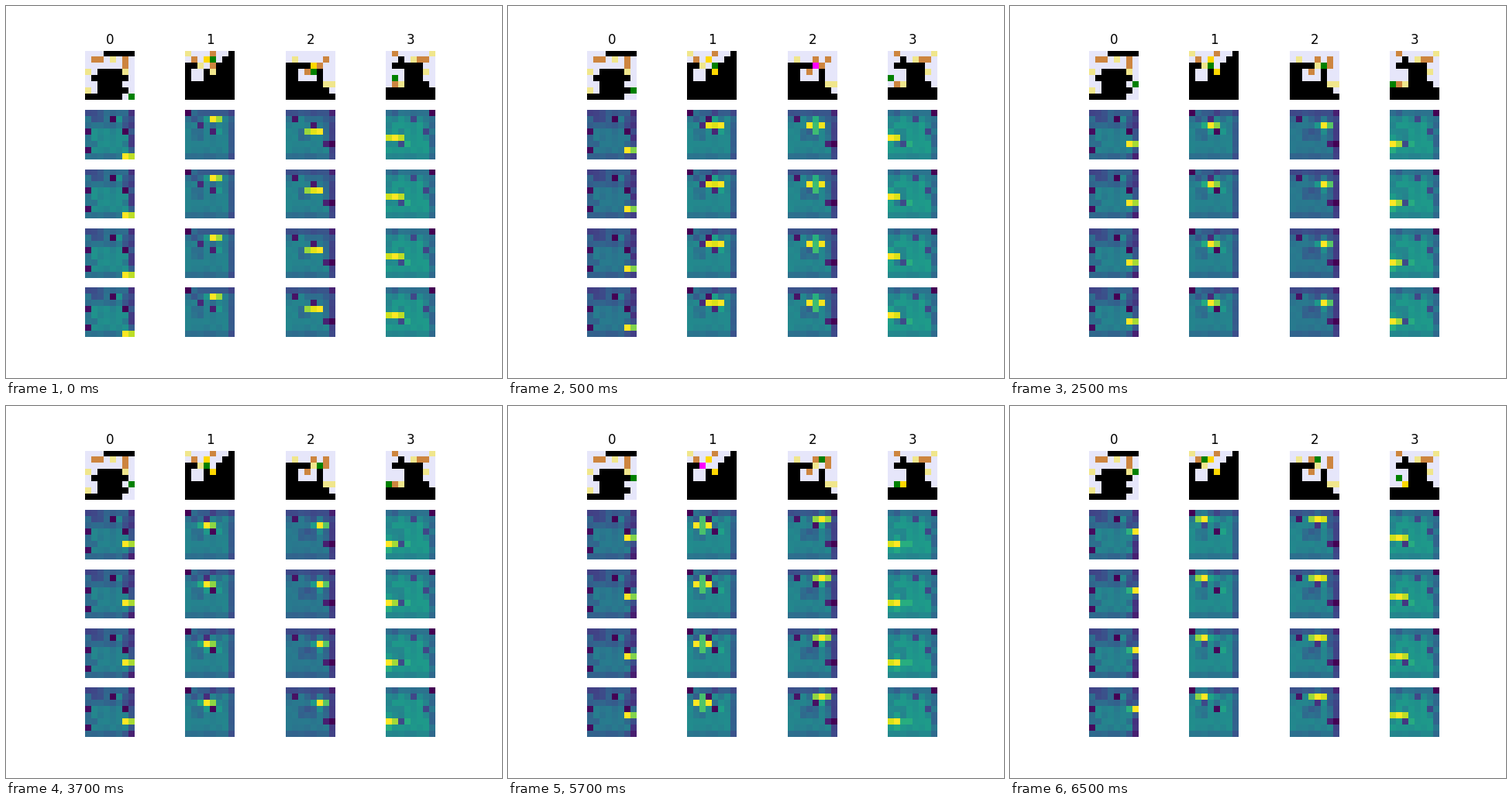
Recreate the animation shown at these times as a matplotlib script. Size 640 by 480 pixels, loop 8 s.

```python
import matplotlib.pyplot as plt
import numpy as np
from matplotlib.animation import FuncAnimation
from matplotlib.colors import to_rgb

SIZE = 8
MOVES = {"U": (-1, 0), "D": (1, 0), "L": (0, -1), "R": (0, 1)}

# walls are blocks: top, left, bottom, right (inclusive)
LEVELS = [
    dict(
        walls=[(0, 3, 0, 7), (3, 2, 7, 5), (4, 1, 4, 6), (6, 6, 6, 6), (7, 0, 7, 1)],
        goals=[(1, 4), (3, 0), (3, 6), (6, 0)],
        boxes=[(1, 1), (1, 2), (1, 6), (2, 6)],
        agent=(7, 7), moves="UUUU",
    ),
    dict(
        walls=[(0, 7, 7, 7), (1, 6, 7, 6), (2, 5, 7, 5), (3, 3, 7, 4),
               (5, 0, 7, 2), (2, 0, 4, 0), (2, 1, 2, 1)],
        goals=[(0, 0), (1, 3), (2, 2), (3, 4)],
        boxes=[(0, 4), (1, 1), (1, 3), (2, 4)],
        agent=(1, 4), moves="DLLU",
    ),
    dict(
        walls=[(2, 0, 7, 1), (2, 2, 2, 3), (3, 5, 7, 5), (5, 2, 7, 4),
               (6, 6, 7, 6), (7, 7, 7, 7)],
        goals=[(1, 1), (2, 4), (5, 6), (5, 7)],
        boxes=[(1, 6), (2, 4), (2, 5), (3, 3)],
        agent=(3, 4), moves="URUL",
    ),
    dict(
        walls=[(1, 2, 1, 2), (2, 1, 2, 2), (2, 3, 7, 5), (5, 6, 7, 6), (6, 0, 7, 7)],
        goals=[(0, 7), (1, 4), (3, 6), (5, 2)],
        boxes=[(0, 1), (1, 5), (1, 6), (5, 1)],
        agent=(4, 1), moves="LDRU",
    ),
]


def shift(cell, move):
    return cell[0] + move[0], cell[1] + move[1]


def play(level):
    """Return the agent and box positions before and after every move."""
    agent, boxes = level["agent"], set(level["boxes"])
    states = [(agent, boxes)]
    for move in (MOVES[key] for key in level["moves"]):
        agent = shift(agent, move)
        if agent in boxes:
            boxes = boxes - {agent} | {shift(agent, move)}
        states.append((agent, boxes))
    return states


def wall_mask(level):
    mask = np.zeros((SIZE, SIZE), bool)
    for top, left, bottom, right in level["walls"]:
        mask[top:bottom + 1, left:right + 1] = True
    for cell in level["goals"]:
        mask[cell] = False
    return mask


def draw_board(level, agent, boxes):
    goals = level["goals"]
    cells = np.full((SIZE, SIZE, 3), to_rgb("lavender"))
    cells[wall_mask(level)] = to_rgb("black")
    for cell in goals:
        cells[cell] = to_rgb("khaki")
    for cell in boxes:
        cells[cell] = to_rgb("gold" if cell in goals else "peru")
    cells[agent] = to_rgb("magenta" if agent in goals else "green")
    return cells


def draw_values(level, agent, boxes):
    """Bright around the agent, dark on goals, dimmer on floor and edges."""
    goals = level["goals"]
    values = np.random.default_rng(3).uniform(-.03, .03, (SIZE, SIZE))
    values -= np.where(wall_mask(level), 0, .08)
    values[0] -= .1
    values[-1] -= .08
    values[:, -1] -= .15

    def add(cell, amount):
        if 0 <= min(cell) and max(cell) < SIZE:
            values[cell] += amount

    for cell in boxes:
        add(cell, -.08)
    for cell in goals:
        add(cell, -.3)
        add(shift(cell, MOVES["R"]), .1)
    on_goal = agent in goals
    add(agent, .65)
    for key, move in MOVES.items():
        vertical = .35 if on_goal else .1
        add(shift(agent, move), vertical if key in "UD" else .57)
    return values


fig, axes = plt.subplots(5, 4, figsize=(6.4, 4.8), dpi=100)
columns = []
for index, (level, column) in enumerate(zip(LEVELS, axes.T)):
    column[0].set_title(str(index))
    for ax in column:
        ax.axis("off")
    states = play(level)
    boards = [draw_board(level, *state) for state in states]
    values = [draw_values(level, *state) for state in states]
    top = column[0].imshow(boards[0])
    maps = [ax.imshow(values[0], cmap="viridis") for ax in column[1:]]
    columns.append((top, boards, maps, values))


def update(frame):
    step = (frame + 3) // 4
    for top, boards, maps, values in columns:
        top.set_data(boards[step])
        for image in maps:
            image.set_data(values[step])
            image.autoscale()


animation = FuncAnimation(fig, update, frames=16, interval=500, repeat=True)
plt.show()
```
